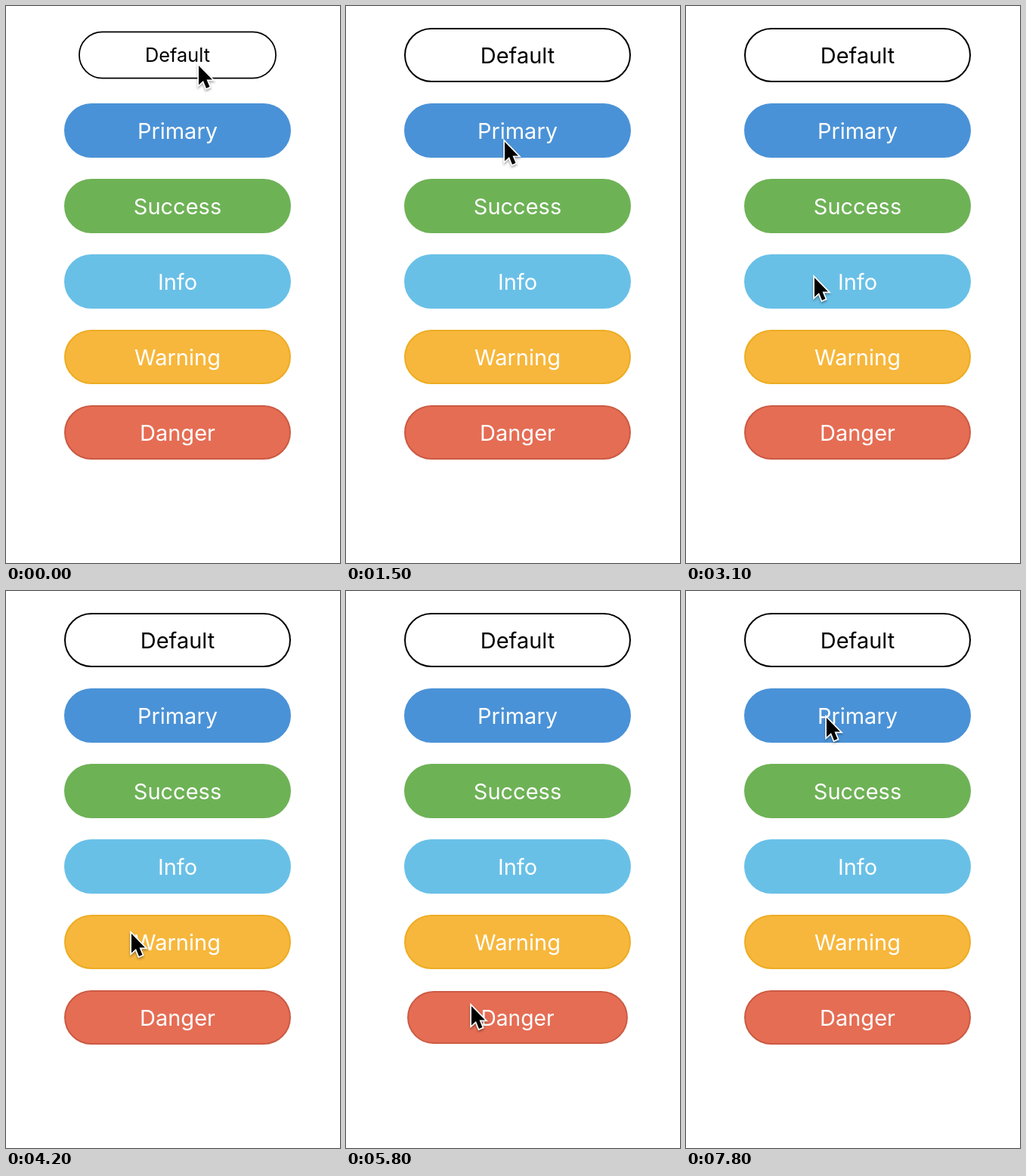
Animation, 442 px wide and 738 px high, one loop 8 s. Source, as an HTML page:

```html
<!DOCTYPE html>
<html lang="en">
<head>
<meta charset="utf-8">
<title>Buttons</title>
<style>
html, body { margin: 0; width: 100%; height: 100%; overflow: hidden; background: #fff; }
svg { display: block; width: 442px; height: 738px; }
text { font: 400 29px Inter, Roboto, sans-serif; text-anchor: middle; }
#cursor { filter: drop-shadow(0 2px 1.5px rgba(0, 0, 0, .35)); }
</style>
</head>
<body>
<svg id="stage" viewBox="0 0 442 738">
  <g id="buttons"></g>
  <g id="cursor">
    <path d="M0 0V25.5L6 20L10 30L14.5 28L10.5 18.5H18Z" fill="#000" stroke="#fff" stroke-width="3.4" paint-order="stroke"/>
  </g>
</svg>
<script>
const LOOP = 8000, STEP = 100;
const NS = 'http://www.w3.org/2000/svg';

// label, fill, border, text colour
const styles = [
  ['Default', '#fff', '#000', '#000'],
  ['Primary', '#4a92d7', '#4a92d7', '#fff'],
  ['Success', '#6eb256', '#6eb256', '#fff'],
  ['Info', '#69c0e7', '#69c0e7', '#fff'],
  ['Warning', '#f7b73c', '#edac22', '#fff'],
  ['Danger', '#e56d54', '#cb5a43', '#fff']
];

// Scale after a press, one value per step; 1 once the list ends.
const soft = [.94, 1.006, .993];
const presses = [
  { button: 0, at: 0, scales: [.873, .94, .975, .99] },
  { button: 1, at: 900, scales: soft },
  { button: 2, at: 2300, scales: soft },
  { button: 3, at: 3400, scales: soft },
  { button: 4, at: 4500, scales: soft },
  { button: 5, at: 5600, scales: [.9, 1.006, .973, 1.003, .993] },
  { button: 0, at: 7300, scales: [.9, 1.112, .95, 1.02] }
];

// start, end, x, y
const start = [255, 79];
const moves = [
  [200, 700, 210, 180],
  [1500, 2100, 188, 274],
  [2650, 3100, 170, 360],
  [3750, 4200, 166, 454],
  [4900, 5300, 166, 550],
  [6330, 7100, 192, 76],
  [7450, 7800, 186, 168]
];

function add(parent, tag, attrs) {
  const el = document.createElementNS(NS, tag);
  for (const key in attrs) el.setAttribute(key, attrs[key]);
  return parent.appendChild(el);
}

const cursor = document.getElementById('cursor');
const root = document.getElementById('buttons');
const buttons = styles.map(([label, fill, stroke, color]) => {
  const g = add(root, 'g', {});
  add(g, 'rect', { x: -149, y: -35, width: 298, height: 70, rx: 35, fill, stroke, 'stroke-width': 2 });
  add(g, 'text', { y: 10.8, fill: color }).textContent = label;
  return g;
});

const ease = u => u * u * (3 - 2 * u);

function scaleAt(button, t) {
  for (const p of presses) {
    const i = (t - p.at) / STEP;
    if (p.button === button && i >= 0 && i < p.scales.length) return p.scales[i];
  }
  return 1;
}

function cursorAt(t) {
  let [x, y] = start;
  for (const [from, to, tx, ty] of moves) {
    const k = ease(Math.min(1, Math.max(0, (t - from) / (to - from))));
    x += (tx - x) * k;
    y += (ty - y) * k;
  }
  return [x, y];
}

function render(time) {
  const t = Math.floor(time % LOOP / STEP) * STEP;
  buttons.forEach((g, i) => {
    g.setAttribute('transform', `translate(227 ${65 + i * 100}) scale(${scaleAt(i, t)})`);
  });
  cursor.setAttribute('transform', `translate(${cursorAt(t)})`);
}

const origin = performance.now();
function tick() {
  render(performance.now() - origin);
  requestAnimationFrame(tick);
}
tick();
</script>
</body>
</html>
```
